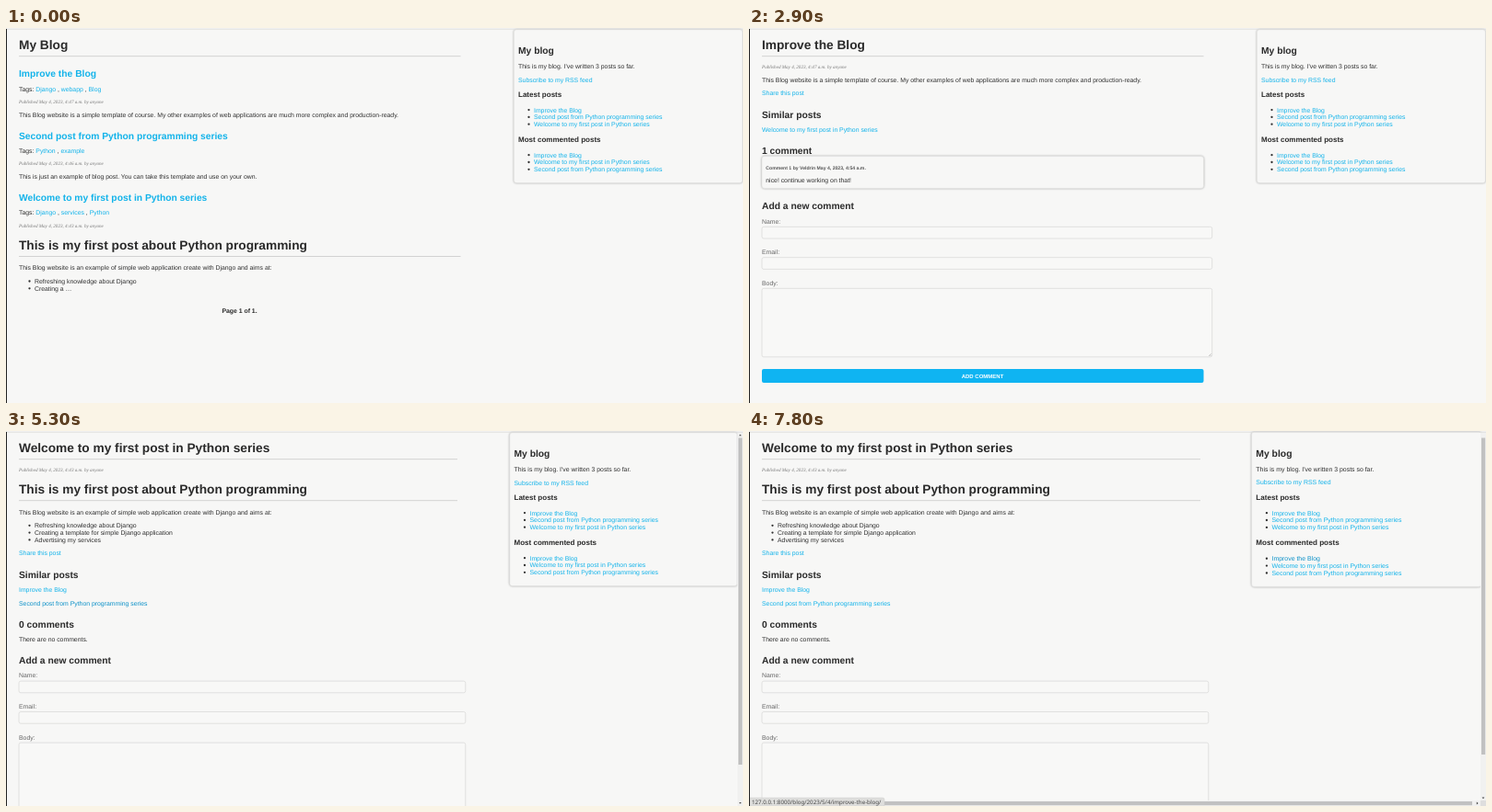
An HTML page that plays this animation: 800x408 px, repeating every 8000 ms.

```html
<!DOCTYPE html>
<html lang="en">
<head>
<meta charset="utf-8">
<title>My Blog</title>
<style>
html, body { margin: 0; width: 100%; height: 100%; overflow: hidden; background: #f7f7f6; }
svg { display: block; }
text { font: 6.86px "Liberation Sans", Arial, sans-serif; fill: #303030; text-rendering: geometricPrecision; white-space: pre; }
.h1, .h2, .h3, .bold { font-weight: bold; fill: #2a2a2a; }
.h1 { font-size: 13.71px; }
.h2 { font-size: 10.29px; }
.h3 { font-size: 8.02px; }
.date { font: italic 5.14px "Liberation Serif", Times, serif; fill: #777; }
.meta { font-size: 5.14px; font-weight: bold; fill: #555; }
.label { fill: #666; }
.link { fill: #12b3ea; }
.button { font-size: 6px; font-weight: bold; fill: #fff; }
.mid { text-anchor: middle; }
.url { font: 6.2px "Noto Sans", "Open Sans", sans-serif; fill: #444; }
.panel { fill: #f7f7f6; stroke: #e2e2e1; stroke-width: .6; filter: drop-shadow(0 .3px 1px #0005); }
.field { fill: #f8f8f7; stroke: #dededd; stroke-width: .9; }
</style>
</head>
<body>
<svg id="stage" width="800" height="408" viewBox="0 0 800 408"></svg>
<script>
const text = (cls, x, y, s, id = '') => `<text class="${cls}" id="${id}" x="${x}" y="${y}">${s}</text>`;
const rect = (x, y, w, h, attrs) => `<rect x="${x}" y="${y}" width="${w}" height="${h}" ${attrs}/>`;
const group = (id, ...parts) => `<g id="${id}">${parts.join('')}</g>`;
const path = (d, attrs) => `<path d="${d}" ${attrs}/>`;

const para = (y, s) => text('', 14, y, s);
const link = (y, s, id) => text('link', 14, y, s, id);
const h2 = (y, s) => text('h2', 14, y, s);
const title = (y, s, right) => text('h1', 14, y, s) +
  path(`M14 ${y + 7.7}H${right}`, 'stroke="#cfcfce" stroke-width=".9"');
const date = (y, time) => text('date', 14, y, `Published May 4, 2023, ${time} a.m. by anyone`);
const items = (x, y, list, cls = '', ids = []) => list.map((s, i) => {
  const row = y + i * 7.8;
  return `<circle cx="${x - 5.5}" cy="${row - 2.4}" r="1.15" fill="#303030"/>` + text(cls, x, row, s, ids[i]);
}).join('');
const tags = (y, ...names) => para(y, 'Tags: ' + names.map(n => `<tspan class="link">${n}</tspan>`).join(' , '));
const teaser = (y, name, time, names, id) =>
  text('h2 link', 14, y, name, id) + tags(y + 15.2, ...names) + date(y + 28.6, time);

const form = (y, right) => {
  const w = right - 14;
  const field = (dy, h) => rect(14, y + dy, w, h, 'class="field" rx="2"');
  const label = (dy, s) => text('label', 14, y + dy, s);
  return h2(y, 'Add a new comment') +
    label(15.3, 'Name:') + field(19, 12.7) +
    label(48.8, 'Email:') + field(52.4, 12.7) +
    label(82.4, 'Body:') + field(86, 74.6) +
    path(`M${right - 3.5} ${y + 159.6}l2.5-2.5m-1 2.5l1-1`, 'stroke="#888" stroke-width=".5"') +
    rect(14, y + 173.7, 479.5, 15, 'rx="2" fill="#0fb4f2"') +
    text('button mid', 253.5, y + 183.4, 'ADD COMMENT');
};

const IMPROVE = 'Improve the Blog';
const SECOND = 'Second post from Python programming series';
const WELCOME = 'Welcome to my first post in Python series';
const FIRST = 'This is my first post about Python programming';
const INTRO = 'This Blog website is an example of simple web application create with Django and aims at:';
const TEMPLATE = 'This Blog website is a simple template of course. My other examples of web applications are much more complex and production-ready.';

const home = group('home',
  title(23, 'My Blog', 493.5),
  teaser(53.3, IMPROVE, '4:47', ['Django', 'webapp', 'Blog'], 'homeLink'),
  para(96.5, TEMPLATE),
  teaser(120.8, SECOND, '4:46', ['Python', 'example']),
  para(164, 'This is just an example of blog post. You can take this template and use on your own.'),
  teaser(188.2, WELCOME, '4:43', ['Django', 'services', 'Python']),
  title(240.8, FIRST, 493.5),
  para(263.4, INTRO),
  items(31, 277.9, ['Refreshing knowledge about Django', 'Creating a …']),
  text('bold mid', 253.5, 310.4, 'Page 1 of 1.'));

const post = group('post',
  title(23, IMPROVE, 493.5), date(44.4, '4:47'), para(58.8, TEMPLATE),
  link(73.4, 'Share this post'),
  h2(97.6, 'Similar posts'), link(113.2, WELCOME, 'postLink'),
  h2(137, '1 comment'),
  rect(14, 139.6, 479.5, 34.8, 'class="panel" rx="3"'),
  text('meta', 18.3, 154, 'Comment 1 by Veldrin May 4, 2023, 4:54 a.m.'),
  text('', 18.3, 168, 'nice! continue working on that!'),
  form(197.3, 502.7));

const series = group('series',
  title(23, WELCOME, 490), date(44.4, '4:43'), title(68, FIRST, 490),
  para(90.7, INTRO),
  items(31, 105.2, ['Refreshing knowledge about Django',
    'Creating a template for simple Django application', 'Advertising my services']),
  link(135.4, 'Share this post'),
  h2(159.6, 'Similar posts'), link(174.9, IMPROVE), link(189.5, SECOND, 'seriesLink'),
  h2(213.6, '0 comments'), para(229, 'There are no comments.'),
  form(253.1, 498.8));

const side = group('side',
  rect(551.3, 1.8, 248, 166.8, 'id="sideBox" class="panel" rx="3"'),
  text('h2', 556, 28.2, 'My blog'),
  text('', 556, 44, "This is my blog. I've written 3 posts so far."),
  text('link', 556, 58.5, 'Subscribe to my RSS feed'),
  text('h3', 556, 75.4, 'Latest posts'),
  items(573, 91.5, [IMPROVE, SECOND, WELCOME], 'link'),
  text('h3', 556, 124.1, 'Most commented posts'),
  items(573, 140.6, [IMPROVE, WELCOME, SECOND], 'link', ['sideLink']));

const vbar = group('vbar',
  rect(794, 1.5, 6, 406.5, 'fill="#f1f1f0"'),
  path('M795.6 5.2h2.8l-1.4-1.8zM795.6 404h2.8l-1.4 1.8z', 'id="vArrows" fill="#555"'),
  rect(795, 7.5, 4.2, 355.5, 'id="vThumb" fill="#c1c1c1"'));
const hbar = group('hbar',
  rect(1, 402, 799, 6, 'fill="#f1f1f0"'),
  rect(794, 402, 6, 6, 'fill="#dedede"'),
  rect(7.5, 403, 777.5, 4.2, 'fill="#c1c1c1"'),
  path('M4.8 403.6v2.8l-1.8-1.4z', 'fill="#aaa"'),
  path('M789.8 403.6v2.8l1.8-1.4zM795.6 398.4h2.8l-1.4 1.8z', 'fill="#444"'));
const status = group('status',
  path('', 'id="statusBox" fill="#dededc" stroke="#cfcfcd" stroke-width=".5"'),
  text('url', 3, 406, '', 'url'));

stage.innerHTML = home + post + series + side + vbar + hbar + status +
  path('M0 1.2H800', 'stroke="#dcdcdb" stroke-width=".9"') + rect(0, 1, 1, 407, 'fill="#222"');

const el = id => document.getElementById(id);
const ramp = (t, a, b) => Math.min(1, Math.max(0, (t - a) / (b - a)));
const pulse = (t, a, b, c, d) => ramp(t, a, b) - ramp(t, c, d);
const show = (id, on) => { el(id).style.display = on ? '' : 'none'; };
const BASE = [18, 179, 234], HOVER = [12, 145, 200];
const hover = (id, k) => {
  el(id).style.fill = `rgb(${BASE.map((c, i) => c + (HOVER[i] - c) * k)})`;
};

function draw(t) {
  const onSeries = t >= 4300, wide = t >= 6300;
  show('home', t < 1900);
  show('post', t >= 1900 && !onSeries);
  show('series', onSeries);
  show('vbar', onSeries);
  show('hbar', wide);
  show('vArrows', !wide);
  el('vThumb').setAttribute('height', wide ? 344.5 : 355.5);

  hover('homeLink', ramp(t, 700, 1100));
  hover('postLink', ramp(t, 3100, 3500));
  hover('seriesLink', pulse(t, 5000, 5300, 5400, 5700));
  hover('sideLink', ramp(t, 7200, 7400));

  // The sidebar grows slightly around its centre under the pointer.
  const k = 1 + .01 * ramp(t, 6200, 6500);
  el('side').setAttribute('transform', onSeries
    ? `translate(670.5 85) scale(${k}) translate(-675 -85)` : '');
  el('sideBox').setAttribute('width', onSeries ? 247 : 248);

  const toSeries = t >= 3000 && t < 5000;
  const right = toSeries ? 219 : 147;
  el('statusBox').setAttribute('d', `M0 408V399H${right - 2}q2 0 2 2V408z`);
  el('url').textContent = '127.0.0.1:8000/blog/2023/5/4/' +
    (toSeries ? 'welcome-to-my-first-post-in-python-series/' : 'improve-the-blog/');
  el('status').style.opacity = pulse(t, 900, 1200, 2000, 2300) +
    pulse(t, 3200, 3500, 4400, 4700) + ramp(t, 7200, 7400);
}

function tick() {
  draw(performance.now() % 8000);
  requestAnimationFrame(tick);
}
tick();
</script>
</body>
</html>
```
